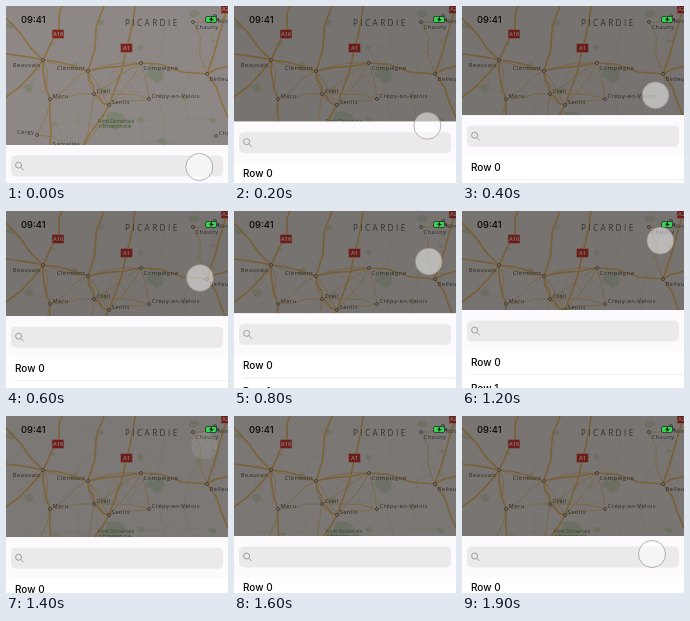
These frames come from a looping animation (222 px wide and 177 px high, 2000 ms). An HTML page:

```html
<!DOCTYPE html>
<html lang="en">
<head>
<meta charset="utf-8">
<title>Bottom sheet over a map</title>
<style>
html, body { margin: 0; width: 100%; height: 100%; overflow: hidden; background: #fff; }
svg { display: block; width: 100vw; height: 100vh; }
text { font-family: "Open Sans", sans-serif; }
.ui text { font-family: Inter, sans-serif; font-weight: 500; fill: #080808; }
#roads { fill: none; stroke-linecap: round; stroke-linejoin: round; }
#towns text { font-size: 5.8px; letter-spacing: .45px; fill: #55504b; }
#towns circle { fill: #fff8ee; stroke: #504b46; stroke-width: .7; }
#badges rect { fill: #dc3a31; stroke: #f1d3c8; stroke-width: .6; }
#badges text { font-size: 5.5px; font-weight: 700; text-anchor: middle; fill: #f8dcd6; }
</style>
</head>
<body>
<svg viewBox="0 0 222 177">
  <rect width="222" height="177" fill="#f4ece6"/>
  <g id="parks" fill="#d9dfc6"></g>
  <g id="roads"></g>
  <g id="towns"></g>
  <text x="119" y="19.5" font-size="8.2" letter-spacing="2.4" fill="#67615c">PICARDIE</text>
  <g fill="#5e8c4a" font-size="4.7" text-anchor="middle">
    <text x="110" y="116.5">Forêt Domaniale</text>
    <text x="109" y="122">d'Ermenonville</text>
  </g>
  <g id="badges"></g>
  <rect id="dim" width="222" height="177"/>
  <g class="ui">
    <text x="15" y="17" font-size="9.4">09:41</text>
    <rect x="199.5" y="10.5" width="11" height="6" rx="1.5" fill="#35d451" stroke="#202020" stroke-width=".7"/>
    <path d="M212 12v3" stroke="#202020"/>
    <path d="M206 10.8l-3 3h2l-1 2.5 4-3.3h-2z" fill="#161616"/>
    <g id="sheet">
      <rect width="222" height="100" fill="#fff"/>
      <rect width="222" height="41" fill="#fcfafc"/>
      <rect x="5" y="10.5" width="212" height="21" rx="5" fill="#ebe9ec"/>
      <g fill="none" stroke="#959297" stroke-width=".9">
        <circle cx="12.6" cy="20" r="3"/>
        <path d="M14.8 22.2l3 3"/>
      </g>
      <text x="9" y="55.4" font-size="10">Row 0</text>
      <path d="M9 64.5h213" stroke="#e6e4e8" stroke-width=".7"/>
      <text x="9" y="81.6" font-size="10">Row 1</text>
    </g>
  </g>
  <circle id="touch" r="13.5" fill="#fff" fill-opacity=".5" stroke="#8c8482" stroke-width=".6"/>
</svg>
<script>
const el = id => document.getElementById(id);

let seed = 7;
const random = () => (seed = seed * 16807 % 2147483647) / 2147483647;
const jitter = size => (random() - .5) * size;

// name, marker position, side of the marker that carries the label
const towns = [
  ["Beauvais", 37, 54, "sw"], ["Clermont", 82, 65, "nw"], ["Compiègne", 135, 57, "se"],
  ["Creil", 88, 88, "ne"], ["Senlis", 103, 99, "ne"], ["Meru", 44, 93, "ne"],
  ["Crépy-en-Valois", 143, 93, "ne"], ["Cergy", 31, 129, "nw"], ["Sarcelles", 77, 141, "nw"],
  ["Chauny", 187, 16, "se"], ["Belleu", 201, 68, "se"], ["Château", 210, 130, "ne"],
  ["Nin", 209, 10, "se"]
].map(([name, x, y, side]) => ({ name, x, y, side }));

el("towns").innerHTML = towns.map(({ name, x, y, side }) => {
  const west = side.includes("w");
  return `<circle cx="${x}" cy="${y}" r="1.5"/>
    <text x="${x + (west ? -2.5 : 2.5)}" y="${y + (side.includes("s") ? 6.5 : -1.5)}"
      text-anchor="${west ? "end" : "start"}">${name}</text>`;
}).join("");

const badges = [
  { name: "A16", x: 52, y: 28 }, { name: "A1", x: 120.5, y: 42 }, { name: "A26", x: 221, y: 3 }
];
el("badges").innerHTML = badges.map(({ name, x, y }) =>
  `<rect x="${x - 6}" y="${y - 4.5}" width="12" height="9" rx="1"/><text x="${x}" y="${y + 2}">${name}</text>`
).join("");

// A winding line through the given places
function winding(stops, wobble) {
  let d = `M${stops[0].x} ${stops[0].y}`;
  stops.slice(1).forEach((b, i) => {
    const a = stops[i];
    for (const k of [1 / 3, 2 / 3]) {
      d += `L${a.x + (b.x - a.x) * k + jitter(wobble)} ${a.y + (b.y - a.y) * k + jitter(wobble)}`;
    }
    d += `L${b.x} ${b.y}`;
  });
  return d;
}
const road = (stops, color, width, wobble) =>
  `<path d="${winding(stops, wobble)}" stroke="${color}" stroke-width="${width}"/>`;

const distance = (a, b) => Math.hypot(a.x - b.x, a.y - b.y);
function links(places, reach) {
  return places.flatMap((a, i) => places.slice(i + 1)
    .filter(b => distance(a, b) < reach).map(b => [a, b]));
}

const edge = (x, y) => ({ x, y });
const place = name => [...towns, ...badges].find(p => p.name === name);
const highways = [
  [edge(56, 0), place("A16"), place("Beauvais"), place("Meru"), edge(44, 140)],
  [edge(129, 0), place("A1"), place("Senlis"), place("Sarcelles")],
  [edge(0, 48), place("Beauvais"), place("Clermont"), place("Compiègne"), place("Belleu"), edge(222, 60)],
  [place("A26"), place("Belleu"), edge(222, 112)],
  [edge(98, 0), place("Clermont"), place("Creil"), place("Senlis")],
  [edge(0, 12), place("Beauvais"), edge(0, 91)]
];

// Scattered villages on a loose grid
const villages = Array.from({ length: 48 }, (_, i) =>
  edge(14 + i % 8 * 28 + jitter(20), 12 + Math.floor(i / 8) * 26 + jitter(18)));

el("roads").innerHTML =
  links(villages, 28).map(pair => road(pair, "#efdcb9", .6, 4)).join("") +
  links(towns, 58).map(pair => road(pair, "#f3cf91", 1, 6)).join("") +
  highways.map(stops => road(stops, "#f3c275", 1.7, 5)).join("");

function park({ x, y }, size) {
  const corners = Array.from({ length: 9 }, (_, i) => {
    const angle = i / 9 * 2 * Math.PI, r = size * (.6 + .6 * random());
    return `${x + r * Math.cos(angle)},${y + r * .8 * Math.sin(angle)}`;
  });
  return `<polygon points="${corners.join(" ")}"/>`;
}
el("parks").innerHTML = park(edge(108, 115), 12) + park(edge(148, 68), 11) +
  villages.filter((_, i) => i % 3 === 0).map(v => park(v, 2 + 4 * random())).join("");

const DURATION = 2000, STEP = 100, RELEASE = 1200, TOUCH = 1900;
const REST = 120, GRAB_Y = 138;

// The drag slows down exponentially; the touch fades after release.
function fingerAt(t) {
  if (t >= TOUCH) return { x: 190, y: GRAB_Y, opacity: 1 };
  const u = Math.min(t, RELEASE);
  return {
    x: 193.3 + 5 * (u / RELEASE) ** 3,
    y: 5 + 156 * Math.exp(-u / 650),
    opacity: Math.max(0, 1 - (t - u) / 250)
  };
}

const rubberBand = pull => .25 * pull / (1 + .25 * pull / 91);

function draggedTop(y) {
  const pull = GRAB_Y - y;
  return REST - (pull > 0 ? rubberBand(pull) : .83 * pull);
}

function sheetTop(t) {
  const top = draggedTop(fingerAt(t).y);
  if (t <= RELEASE || t >= TOUCH) return top;
  const u = (t - RELEASE) / 1000;
  return REST + (top - REST) * Math.exp(-11.5 * u) * Math.cos(11 * u);
}

function draw(now) {
  const t = Math.floor(now % DURATION / STEP) * STEP;
  const finger = fingerAt(t), top = sheetTop(t);
  el("sheet").setAttribute("transform", `translate(0 ${top})`);
  el("dim").setAttribute("opacity", Math.min(.51, .5 - (top - REST) * .004));
  el("touch").setAttribute("transform", `translate(${finger.x} ${finger.y})`);
  el("touch").setAttribute("opacity", finger.opacity);
}

const start = performance.now();
function tick() {
  draw(performance.now() - start);
  requestAnimationFrame(tick);
}
tick();
</script>
</body>
</html>
```
